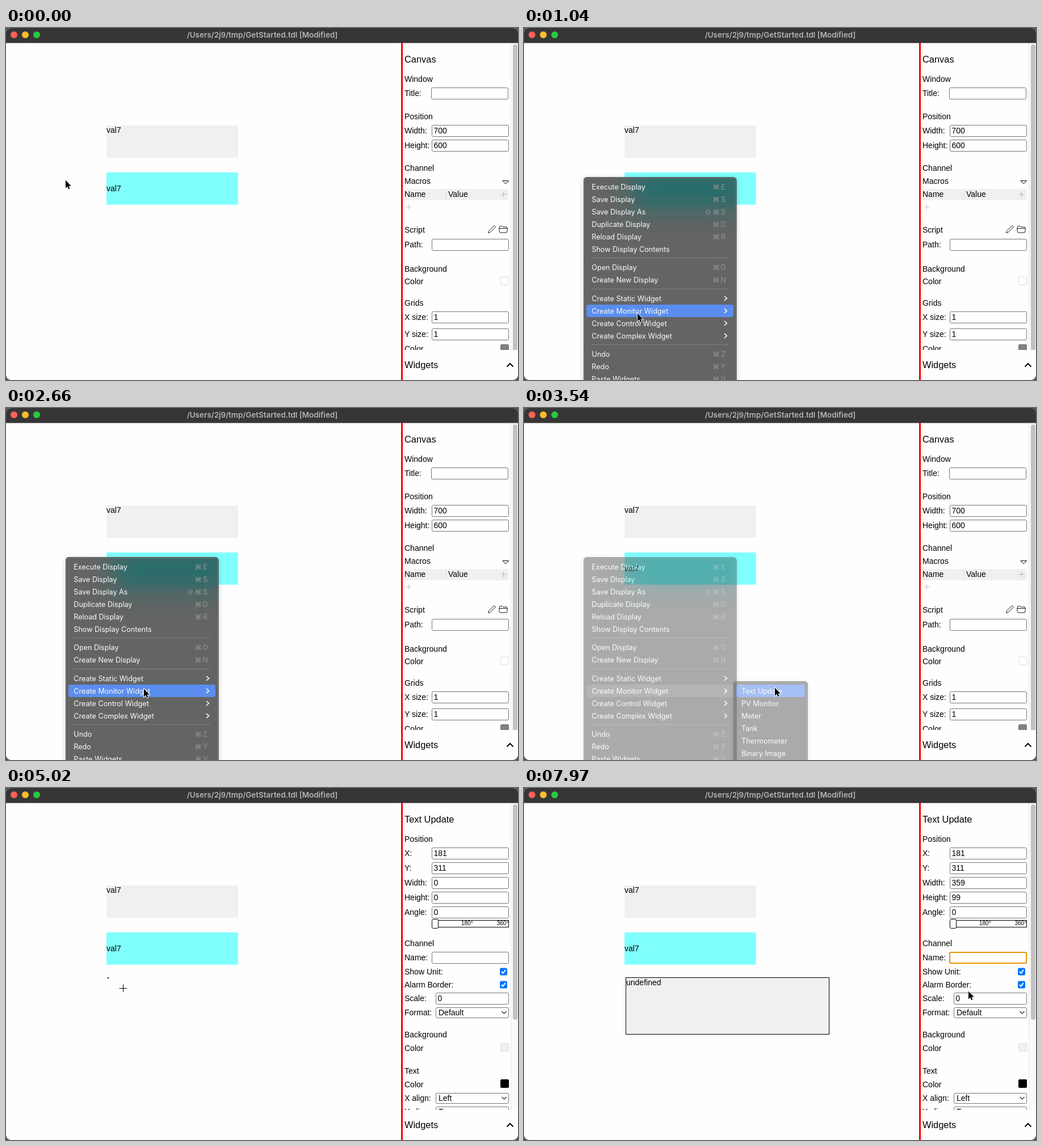
These frames come from a looping animation (902 px wide and 621 px high, 8000 ms). An HTML page:

```html
<!DOCTYPE html>
<html lang="en">
<head>
<meta charset="utf-8">
<title>Display editor</title>
<style>
html, body { margin: 0; width: 100%; height: 100%; overflow: hidden; background: #555; }
svg { display: block; width: 902px; height: 621px; }
text { font: 14px "Liberation Sans", Arial, sans-serif; fill: #000; white-space: pre; }
.big { font-size: 16.4px; }
.tiny { font-size: 10px; }
.title { font: 600 13.4px Inter, sans-serif; fill: #b5b5b5; text-anchor: middle; }
.menu text { font: 12.6px Inter, sans-serif; fill: #fafafa; }
.menu .key { font-family: Inter, "DejaVu Sans", sans-serif; fill: #929493; text-anchor: middle; }
.line { fill: none; stroke: #000; }
</style>
</head>
<body>
<svg id="stage" viewBox="0 0 902 621" xmlns="http://www.w3.org/2000/svg"></svg>
<script>
const LOOP = 8000;

// ---- drawing helpers ----
const text = (x, y, s, cls = "", id = "") =>
  `<text x="${x}" y="${y}" class="${cls}"${id && ` id="${id}"`}>${s}</text>`;
const rect = (x, y, w, h, fill, more = "") =>
  `<rect x="${x}" y="${y}" width="${w}" height="${h}" fill="${fill}" ${more}/>`;
const line = (points, stroke = "#000", width = 1) =>
  `<polyline points="${points}" fill="none" stroke="${stroke}" stroke-width="${width}"/>`;
const group = (id, body, more = "") => `<g id="${id}" ${more}>${body}</g>`;

// Panel parts take the middle of their row.
const label = (y, s) => text(702, y + 5, s);
const head = (y, s) => text(702, y + 6, s, "big");
const box = (x, y, w, h) => rect(x + .5, y + .5, w - 1, h - 1, "#fff", 'rx="2" stroke="#767676"');
const field = (y, name, value = "", x = 750, id = "") =>
  label(y, name) + box(x, y - 10, 886 - x, 21) + text(x + 3.5, y + 5, value, "", id);
const select = (y, name, value) =>
  label(y, name) + box(757, y - 9, 129, 19) + text(762, y + 5, value) +
  line(`873.5,${y - 2} 877.5,${y + 2} 881.5,${y - 2}`, "#222", 1.2);
const swatch = (y, fill, edge) =>
  rect(871.5, y + .5, 14, 14, fill, `rx="1.5" stroke="${edge}"`);
const check = (y, name) =>
  label(y, name) + rect(870, y - 6.5, 13, 13, "#0075ff", 'rx="2.5"') +
  line(`873,${y} 875.4,${y + 2.6} 880,${y - 3.2}`, "#fff", 2);
const plus = (x, y, c) => line(`${x - 5},${y} ${x + 5},${y}`, c) + line(`${x},${y - 5} ${x},${y + 5}`, c);

// ---- side panels ----
const canvasPanel =
  head(55, "Canvas") +
  label(90, "Window") + label(115, "Title:") + box(749, 105, 136, 21) +
  label(156, "Position") + field(181, "Width:", 700) + field(207, "Height:", 600) +
  label(247, "Channel") + label(270, "Macros") +
  '<path d="M875 269.500h10.500l-5.250 5.500z" class="line"/>' +
  rect(702, 284, 184, 20, "#f0f0f0") + rect(775, 284, 1, 20, "#e2e2e2") +
  label(293, "Name") + text(779, 298, "Value") +
  plus(876.5, 293.5, "#b5b5b5") + plus(709.5, 315.5, "#c4c4c4") +
  label(356, "Script") +
  '<path d="M849.500 361.500l1-3.500 9.500-9.500 2.500 2.500-9.500 9.500z" class="line" stroke-width=".9"/>' +
  '<path d="M869.500 353.500v-3q0-1 1-1h3.500l1.500 1.500h6q1 0 1 1v1.500M868.500 353.500h15l-1 6.500q-.2 1-1.200 1h-10.600q-1 0-1.200-1z" class="line" stroke-width=".9"/>' +
  field(382, "Path:") +
  label(425, "Background") + label(447, "Color") + swatch(438.5, "#fefefe", "#ddd") +
  label(485, "Grids") + field(510, "X size:", 1) + field(540, "Y size:", 1) +
  label(566, "Color") + swatch(558, "#808080", "#777") +
  rect(893, 29, 8, 545, "#c1c1c1", 'rx="4"');

const widgetPanel =
  head(55, "Text Update") +
  label(90, "Position") + field(115, "X:", 181) + field(141, "Y:", 311) +
  field(167, "Width:", 0, 750, "width") + field(193, "Height:", 0, 750, "height") +
  field(219, "Angle:", 0) +
  rect(756.5, 233.5, 129, 12, "#fff", 'stroke="#000"') +
  rect(750.5, 231.5, 11, 16, "#fff", 'rx="2" stroke="#000"') +
  text(802, 242, "180°", "tiny") + text(864.5, 242, "360°", "tiny") +
  label(274, "Channel") + field(299, "Name:") +
  group("focus", rect(750, 290, 135, 19, "none", 'rx="2" stroke="#e59700" stroke-width="2"')) +
  group("caret", rect(753, 292, 1, 15, "#000")) +
  check(324, "Show Unit:") + check(347, "Alarm Border:") +
  field(371, "Scale:", 0, 757) + select(396, "Format:", "Default") +
  label(435, "Background") + label(459, "Color") + swatch(450, "#f0f0f0", "#ddd") +
  label(499, "Text") + label(523, "Color") + swatch(514, "#000", "#000") +
  select(547, "X align:", "Left") + select(571, "Y align:", "Top") +
  rect(893, 29, 8, 380, "#c1c1c1", 'rx="4"');

// ---- context menu: [middle, name, shortcut] ----
const rows = [
  [280, "Execute Display", "E"], [302, "Save Display", "S"], [324, "Save Display As", "⇧S"],
  [346, "Duplicate Display", "D"], [368, "Reload Display", "R"], [390, "Show Display Contents"],
  [422, "Open Display", "O"], [444, "Create New Display", "N"],
  [477, "Create Static Widget", ">"], [499, "Create Monitor Widget", ">"],
  [521, "Create Control Widget", ">"], [543, "Create Complex Widget", ">"],
  [575, "Undo", "Z"], [597, "Redo", "Y"], [619, "Paste Widgets", "V"]
];
const subNames = ["Text Update", "PV Monitor", "Meter", "Tank", "Thermometer", "Binary Image"];

const shortcut = (y, k) => {
  if (!k) return "";
  if (k === ">") return line(`353,${y - 4} 357.3,${y} 353,${y + 4}`, "#fafafa", 1.7);
  return (k[1] ? text(324.5, y + 4.5, "⇧", "key") : "") +
    text(338.5, y + 4.5, "⌘", "key") + text(351, y + 4.5, k.slice(-1), "key");
};
const plate = (x, y, w) =>
  rect(x - 1, y + 1, w + 2, 400, "#000", 'rx="8" opacity=".15" filter="url(#soft)"') +
  rect(x, y, w, 400, "#636564", 'rx="6"');
const edge = (x, y, w) =>
  rect(x + .5, y + .5, w - 1, 400, "none", 'rx="5.5" stroke="#505251"') +
  rect(x + 1.5, y + 1.5, w - 3, 400, "none", 'rx="5" stroke="#7d807f" stroke-width=".7"');

const mainMenu = plate(105, 263, 269.5) +
  `<g clip-path="url(#menuClip)">${rect(190, 250, 200, 68, "#12706e", 'filter="url(#glow)" opacity=".8"')}</g>` +
  edge(105, 263, 269.5) +
  [405, 460, 558].map(y => rect(119, y, 241, 1, "#808281")).join("") +
  rect(110, 0, 259, 22, "#5a8dee", 'rx="4" id="mainMark"') +
  rows.map(([y, s, k]) => text(119.3, y + 4.5, s) + shortcut(y, k)).join("");

const subMenu = plate(369, 482, 131) + edge(369, 482, 131) +
  rect(374, 488, 120.5, 22, "#5a8dee", 'rx="4" id="subMark"') +
  subNames.map((s, i) => text(383, 503.5 + 22 * i, s)).join("");

// ---- pointers ----
const arrow = '<path transform="translate(1 1.600) scale(.9)" d="M0 0V15.500L3.600 12.200 5.800 17.300 8.200 16.300 6 11.300H10.800Z" fill="#000" stroke="#fff" stroke-width="2" paint-order="stroke"/>';
const shape = (d, w) => `<path d="${d}" fill="none" stroke="#fff" stroke-width="${w + 1}" opacity=".8"/><path d="${d}" class="line" stroke-width="${w}"/>`;

document.getElementById("stage").innerHTML =
  `<defs>
    <clipPath id="window"><rect width="902" height="621" rx="9"/></clipPath>
    <clipPath id="panelClip"><rect x="699" y="26" width="203" height="542"/></clipPath>
    <clipPath id="menuClip"><rect x="105" y="263" width="269.5" height="400" rx="6"/></clipPath>
    <clipPath id="newClip"><rect id="newArea" x="180" y="335" width="0" height="0"/></clipPath>
    <filter id="soft" x="-20%" y="-20%" width="140%" height="140%"><feGaussianBlur stdDeviation="5"/></filter>
    <filter id="glow" x="-50%" y="-100%" width="200%" height="300%"><feGaussianBlur stdDeviation="20"/></filter>
  </defs>` +
  group("root",
    rect(0, 0, 902, 621, "#fefefe") +
    rect(177, 172, 232, 57, "#f0f0f0") + text(177, 185, "val7") +
    rect(177, 254.8, 231.7, 56.8, "#80ffff") + text(177, 288, "val7") +
    group("fresh", rect(179.5, 334.5, 1, 1, "#f0f0f0", 'id="newBox" stroke="#000"') +
      `<g clip-path="url(#newClip)">${text(180, 348, "undefined")}</g>`) +
    rect(889, 26, 1, 542, "#e8e8e8") + rect(890, 26, 12, 542, "#fafafa") +
    `<g clip-path="url(#panelClip)">${group("canvasPanel", canvasPanel)}${group("widgetPanel", widgetPanel)}</g>` +
    head(594, "Widgets") + line("882.5,597.5 888,592 893.5,597.5", "#000", 2) +
    rect(696, 26, 3, 595, "#f00") +
    rect(0, 0, 902, 26.5, "#363636") +
    ["#ff5f57", "#febc2e", "#28c840"].map((c, i) => `<circle cx="${14 + 20 * i}" cy="12" r="6" fill="${c}"/>`).join("") +
    text(451.5, 16.5, "/Users/2j9/tmp/GetStarted.tdl [Modified]", "title") +
    group("mainMenu", mainMenu, 'class="menu"') + group("subMenu", subMenu, 'class="menu"') +
    group("pointer", group("arrow", arrow) +
      group("cross", shape("M-6.500 .5H7M.5-6.500V7", 1)) +
      group("beam", shape("M-2.500-8Q.5-8 .5-6V6Q.5 8-2.500 8M3.500-8Q.5-8 .5-6M.5 6Q.5 8 3.500 8", 1))),
    'clip-path="url(#window)"');

// ---- timeline: [ms, x, y, pointer] ----
const path = [
  [0, 104, 267, "arrow"], [440, 112, 283], [590, 136, 340], [740, 164, 410], [890, 188, 476],
  [1040, 199, 502], [1190, 201, 505], [1340, 203, 513], [1490, 205, 519], [1640, 207, 520],
  [1780, 209, 512], [1930, 211, 500], [2080, 213, 492], [2220, 215, 482], [2370, 217, 480],
  [2520, 222, 482], [2660, 242, 494], [2810, 290, 498], [2960, 368, 497], [3100, 441, 492],
  [3690, 430, 480, "cross"], [3840, 352, 420], [3990, 250, 365], [4130, 190, 342],
  [4280, 179, 336], [4720, 180, 337], [5020, 206, 353], [5170, 262, 372], [5320, 335, 394],
  [5460, 408, 412], [5610, 470, 425], [5760, 512, 433], [5900, 530, 436], [6050, 535, 437],
  [6190, 536, 438],
  [6630, 545, 429, "arrow"], [6780, 590, 405], [6930, 660, 362], [7080, 725, 322],
  [7230, 765, 303, "beam"], [7380, 776, 300], [7680, 778, 306],
  [7830, 781, 335, "arrow"], [7970, 782, 357]
];

const el = id => document.getElementById(id);
const show = (id, on) => el(id).style.display = on ? "" : "none";
const set = (id, attrs) => { for (const k in attrs) el(id).setAttribute(k, attrs[k]); };
const within = (t, a, b) => t >= a && t < b;

function render(t) {
  let kind, x, y;
  for (const p of path) {
    if (p[0] > t) break;
    [, x, y] = p;
    kind = p[3] || kind;
  }
  set("pointer", { transform: `translate(${x} ${y})` });
  for (const k of ["arrow", "cross", "beam"]) show(k, k === kind);

  // menus
  const subOpen = within(t, 1190, 1490) || within(t, 2810, 3690);
  const inSub = subOpen && x > 374;
  const row = rows.find(r => Math.abs(r[0] - y) <= 11);
  const fade = t >= 3540 ? .54 : 1;
  show("mainMenu", within(t, 290, 3690));
  show("subMenu", subOpen);
  set("mainMenu", { opacity: fade });
  set("subMenu", { opacity: fade });
  show("mainMark", row && t >= 440);
  if (row) set("mainMark", { y: row[0] - 11, fill: inSub ? "#767877" : "#5a8dee" });
  show("subMark", inSub && !within(t, 3400, 3540));

  // new widget and its properties
  const made = t >= 5020;
  const w = t < 5170 ? 0 : Math.min(359, x - 177);
  const h = t < 5170 ? 0 : t >= 6190 ? 99 : y - 339;
  show("canvasPanel", !made);
  show("widgetPanel", made);
  show("fresh", made);
  set("newBox", { width: Math.max(1, w - 1), height: h + 1 });
  set("newArea", { width: Math.max(0, w - 2), height: h });
  el("width").textContent = w;
  el("height").textContent = h;
  show("focus", t >= 7380);
  show("caret", within(t, 7380, 7830));
}

const start = performance.now();
function tick() {
  render((performance.now() - start) % LOOP);
  requestAnimationFrame(tick);
}
tick();
</script>
</body>
</html>
```
